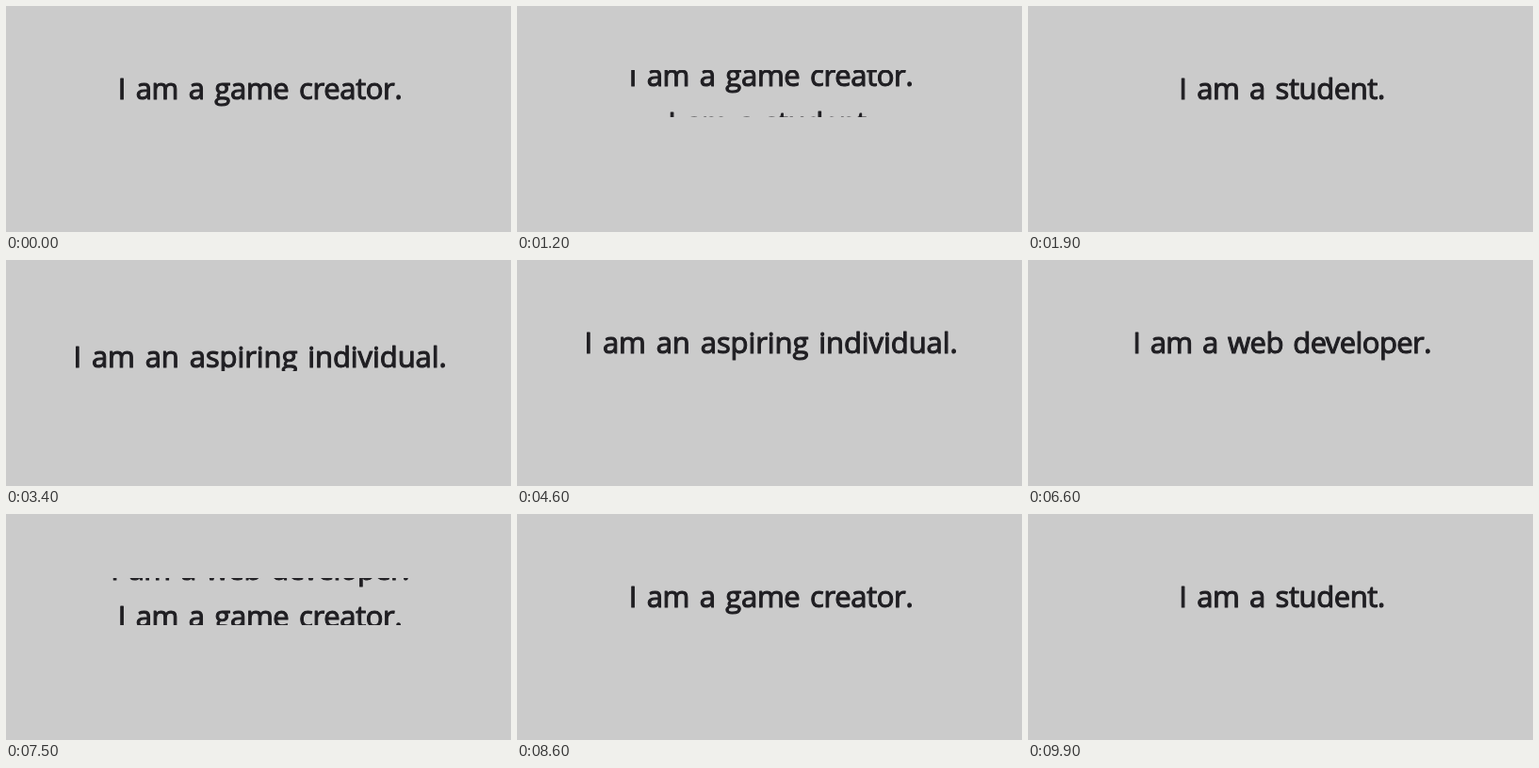
An HTML page with a canvas for the animation above (10 s loop, 536 px wide and 240 px high).

```html
<!DOCTYPE html>
<html lang="en">
<head>
<meta charset="utf-8">
<title>I am</title>
<style>
  html, body { margin: 0; width: 100%; height: 100%; overflow: hidden; background: #cbcbcb; }
  canvas { display: block; width: 536px; height: 240px; }
</style>
</head>
<body>
<canvas id="stage" width="536" height="240"></canvas>
<script>
const ctx = document.getElementById('stage').getContext('2d');
const LOOP = 10000, TICK = 100, MOVE = 1000;
const ROW = 50, TOP = 68, BASE = 98.5, CENTER = 269.5;

const lines = [
  { text: 'I am a web developer.', track: -0.6 },
  { text: 'I am a game creator.', track: -0.35 },
  { text: 'I am a student.', track: -0.4 },
  { text: 'I am an aspiring individual.', track: -0.1 }
];

// The list steps down one row at a time, then rewinds to its first row.
const moves = [
  { at: 850, to: 2 },
  { at: 2780, to: 3 },
  { at: 4900, to: 0 },
  { at: 6960, to: 1 },
  { at: 8900, to: 2 }
];

const swing = p => 0.5 - Math.cos(Math.PI * p) / 2;

function rowAt(time) {
  let row = 1;
  for (const { at, to } of moves) {
    if (time < at) break;
    row += (to - row) * swing(Math.min(1, (time - at) / MOVE));
  }
  return row;
}

function drawLine({ text, track }, y) {
  ctx.letterSpacing = track + 'px';
  ctx.fillText(text, CENTER, y);
  ctx.strokeText(text, CENTER, y);
}

function draw(time) {
  ctx.fillStyle = '#cbcbcb';
  ctx.fillRect(0, 0, 536, 240);
  ctx.save();
  ctx.beginPath();
  ctx.rect(0, TOP, 536, ROW);
  ctx.clip();
  ctx.font = '400 31px "Open Sans", "Noto Sans", sans-serif';
  ctx.textAlign = 'center';
  ctx.wordSpacing = '3px';
  ctx.fillStyle = ctx.strokeStyle = '#201f23';
  ctx.lineWidth = 1.1;
  ctx.lineJoin = 'round';
  const row = rowAt(time);
  lines.forEach((line, i) => {
    if (Math.abs(i - row) < 1.2) drawLine(line, BASE + (i - row) * ROW);
  });
  ctx.restore();
}

const start = performance.now();
function frame() {
  const time = (performance.now() - start) % LOOP;
  draw(Math.floor(time / TICK) * TICK);
  requestAnimationFrame(frame);
}
frame();
</script>
</body>
</html>
```
